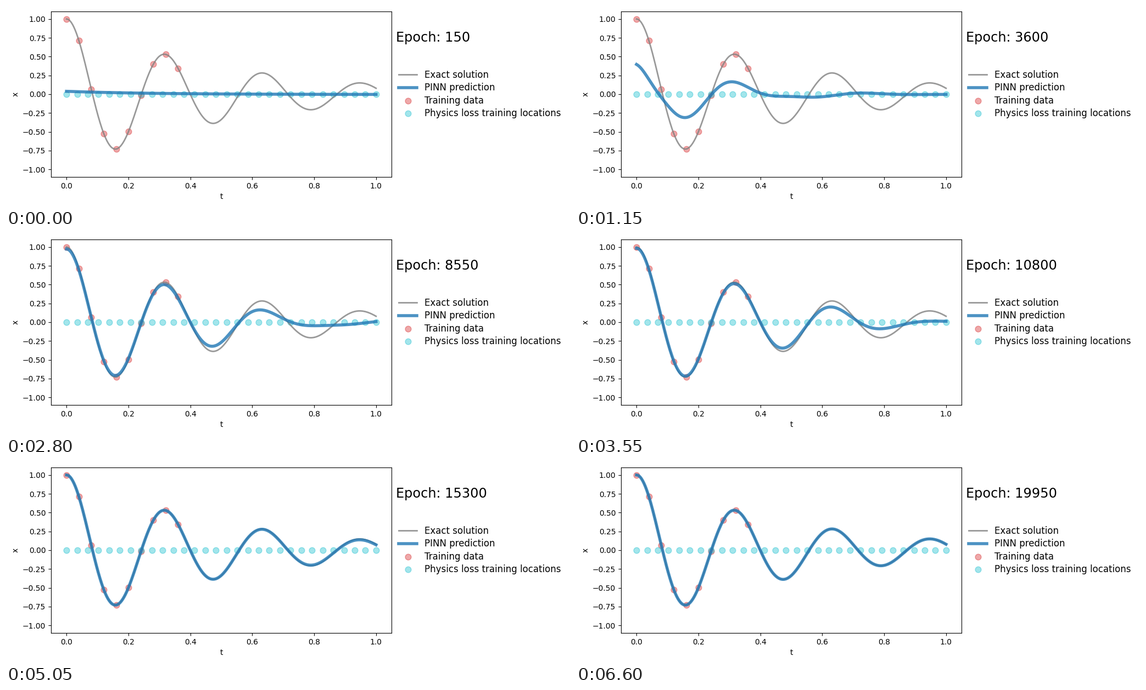
A matplotlib script that plays this animation: 1027 px wide and 365 px high, repeating every 6.65 s.

```python
import numpy as np
import matplotlib.pyplot as plt
from matplotlib.animation import FuncAnimation

W, H, DPI = 1027, 365, 100
FRAMES, STEP_MS, EPOCH_STEP = 133, 50, 150

plt.rcParams["font.family"] = "DejaVu Sans"


def oscillator(t, d=2, w0=20):
    """Underdamped harmonic oscillator released from x = 1."""
    w = np.sqrt(w0**2 - d**2)
    phi = np.arctan(-d / w)
    return np.exp(-d * t) * np.cos(phi + w * t) / np.cos(phi)


def bell(t, mid, width):
    return np.exp(-((t - mid) / width)**2)


def prediction(t, epoch):
    """Network output: the fit grows from the left and its front moves right."""
    k = epoch / 1000
    learned = 1 / (1 + np.exp((3.68 - k) / 0.4))
    level = learned * (1 - 0.037 * np.clip((14.5 - k) / 8, 0, 1))

    # Damping of the not yet learned right-hand side
    damping = np.exp(1.12 - 0.2 * (k - 9) - 0.0087 * (k - 9)**3)
    fit = level * oscillator(t) * np.exp(-damping * t**4)

    # Smooth first guess, and the straight start while the fit is growing
    guess = (0.035 + 0.05 * k) * (1 - learned)**4 * np.exp(-3 * (1 + k) * t) - 0.004 * (1 - learned)
    bend = 0.9 * learned * (1 - learned)**2 * bell(t, 0.045, 0.05)

    # Slow ripple running ahead of the front
    mid = 0.9 - 0.33 * np.exp(3.6 - k)
    size = 0.057 * np.sqrt(learned) * np.exp(-(k / 11)**5)
    ripple = size * np.cos(2 * np.pi * (t - mid) / 0.37) * bell(t, mid, 0.2)

    return fit + guess - bend - ripple


t = np.linspace(0, 1, 500)
exact = oscillator(t)

fig = plt.figure(figsize=(W / DPI, H / DPI), dpi=DPI, facecolor="white")
ax = fig.add_axes([82 / W, 53 / H, 620 / W, 302 / H])

ax.plot(t, exact, color="grey", lw=2, alpha=0.8, label="Exact solution")
pred, = ax.plot(t, prediction(t, EPOCH_STEP), color="tab:blue", lw=4, alpha=0.8,
                label="PINN prediction")
ax.scatter(t[0:200:20], exact[0:200:20], s=60, color="tab:red", alpha=0.4,
           label="Training data")
t_phys = np.linspace(0, 1, 30)
ax.scatter(t_phys, 0 * t_phys, s=60, lw=1, color="tab:cyan", alpha=0.4,
           label="Physics loss training locations")

ax.set(xlim=(-0.05, 1.05), ylim=(-1.1, 1.1), xlabel="t", ylabel="x")
ax.legend(loc=(1.01, 0.333), frameon=False, fontsize="large", labelspacing=0.31)
label = ax.text(1.065, 0.7, "", fontsize="xx-large", color="k")


def draw(i):
    epoch = EPOCH_STEP * (i + 1)
    pred.set_ydata(prediction(t, epoch))
    label.set_text(f"Epoch: {epoch}")
    return pred, label


anim = FuncAnimation(fig, draw, frames=FRAMES, interval=STEP_MS,
                     repeat=True, repeat_delay=0)
plt.show()
```
